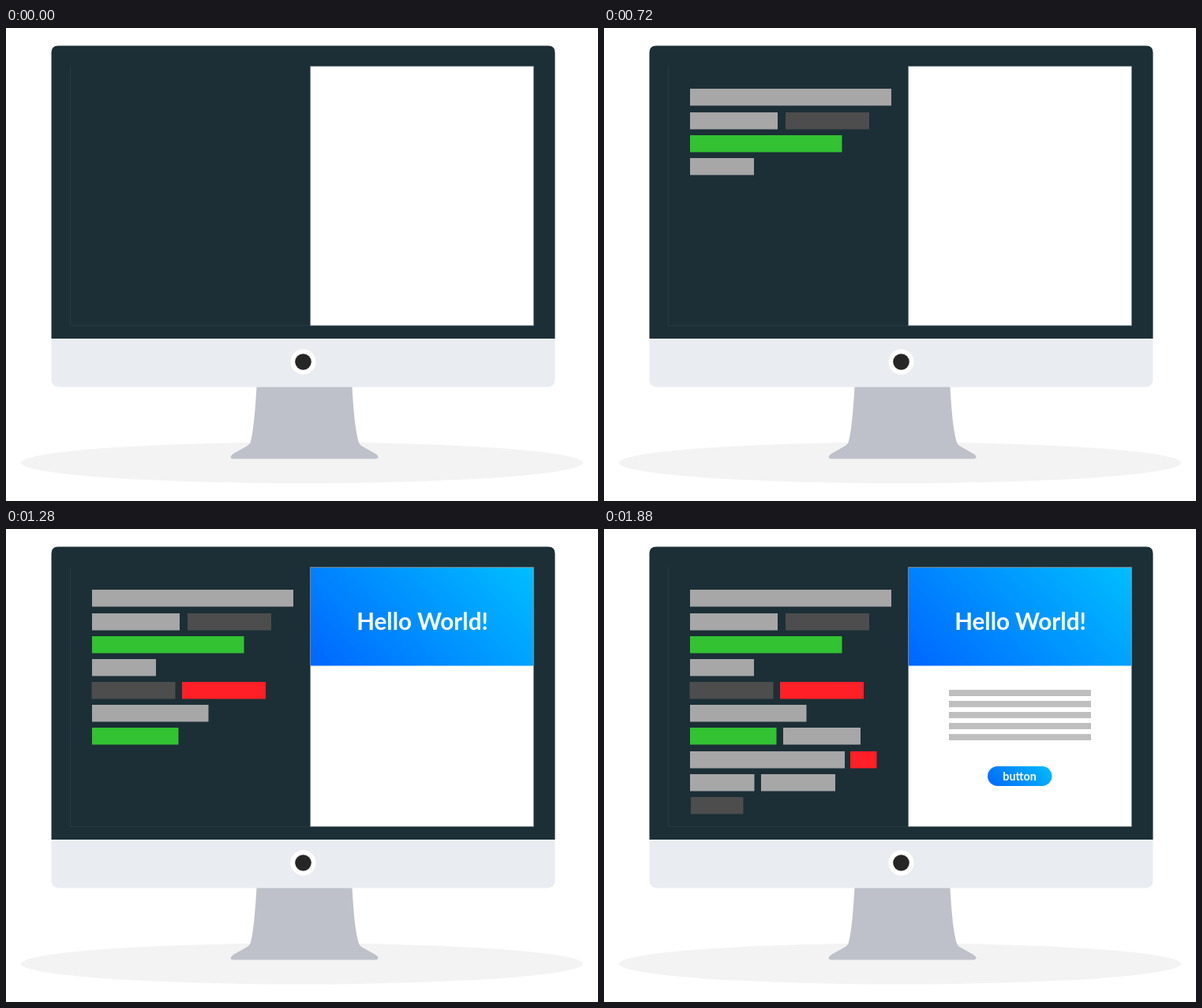
An HTML page that plays this animation: 750x600 px, repeating every 3040 ms.

```html
<!DOCTYPE html>
<html lang="en">
<head>
<meta charset="utf-8">
<title>Hello World</title>
<style>
  html, body { margin: 0; width: 100%; height: 100%; overflow: hidden; background: #fff; }
  svg { display: block; width: 750px; height: 600px; }
  text { font-family: Lato, sans-serif; font-weight: 700; fill: #fff; text-anchor: middle; }
</style>
</head>
<body>
<svg viewBox="0 0 750 600">
  <defs>
    <linearGradient id="sky" gradientUnits="userSpaceOnUse" x1="386" y1="173" x2="589.5" y2="-30.5">
      <stop stop-color="#0066ff"/><stop offset="1" stop-color="#00bfff"/>
    </linearGradient>
    <linearGradient id="pill" gradientUnits="userSpaceOnUse" x1="486" y1="326" x2="539.5" y2="272.5">
      <stop stop-color="#0066ff"/><stop offset="1" stop-color="#00bfff"/>
    </linearGradient>
  </defs>

  <ellipse cx="375" cy="551.5" rx="356" ry="26" fill="#f3f3f3"/>
  <path d="M317.5 455H438.500C440 480 442 510 447 526Q448 529 452 531L468 540Q472 542.500 471.500 544.500Q471 546.500 468 546.500H288Q285 546.500 284.500 544.500Q285 542 288 540L304 531Q308 529 309.500 526C314 510 316 480 317.500 455Z" fill="#bec1c9"/>
  <path d="M57.500 394V31Q57.500 22.500 66 22.500H687Q695.500 22.500 695.500 31V394Z" fill="#1c2f36"/>
  <path d="M57.500 394H695.500V445Q695.500 455.500 685 455.500H68Q57.500 455.500 57.500 445Z" fill="#e9edf2"/>
  <circle cx="376.5" cy="423.5" r="16" fill="#fff"/>
  <circle cx="376.5" cy="423.5" r="10.300" fill="#262626"/>

  <path d="M81.500 48.500V377.500H668.500V48.500" fill="none" stroke="#283b41"/>
  <rect x="385.500" y="48.500" width="283" height="329" fill="#fff" stroke="#64757a" stroke-width=".6"/>

  <g id="code"></g>
  <g id="header">
    <rect x="386" y="49" width="282" height="124.500" fill="url(#sky)"/>
    <text x="527.5" y="128" font-size="29.600">Hello World!</text>
  </g>
  <path id="lines" d="M437 208H617M437 222H617M437 236H617M437 250H617M437 264H617" stroke="#bfbfbf" stroke-width="8"/>
  <g id="button">
    <rect x="486" y="301" width="81.500" height="25" rx="12.500" fill="url(#pill)"/>
    <text x="526.5" y="319" font-size="14.300">button</text>
  </g>
</svg>
<script>
const LOOP = 3040, STEP = 40;
const GREY = '#a7a7a7', DARK = '#4d4d4d', GREEN = '#32c232', RED = '#ff1f26';

// row, x, width, colour, start and end of typing in ms
const bars = [
  [0, 109, 255, GREY, 170, 260],
  [1, 109, 111, GREY, 270, 360],
  [1, 230, 106, DARK, 390, 480],
  [2, 109, 192.5, GREEN, 510, 600],
  [3, 109, 81, GREY, 630, 720],
  [4, 108.5, 106, DARK, 830, 920],
  [4, 223, 106, RED, 950, 1040],
  [5, 109, 147.5, GREY, 1070, 1160],
  [6, 109, 109.5, GREEN, 1190, 1280],
  [6, 227, 98, GREY, 1285, 1360],
  [7, 109, 196, GREY, 1370, 1470],
  [7, 312, 33.5, RED, 1490, 1560],
  [8, 109, 81.5, GREY, 1600, 1680],
  [8, 199, 94, GREY, 1700, 1780],
  [9, 110, 66.5, DARK, 1790, 1860]
];
const popTimes = { header: 840, lines: 1400, button: 1880 };

const code = document.getElementById('code');
const rects = bars.map(([row, x, , fill]) => {
  const rect = document.createElementNS(code.namespaceURI, 'rect');
  const attrs = { x, y: Math.round(77.4 + 29.17 * row), height: 21.5, fill };
  for (const name in attrs) rect.setAttribute(name, attrs[name]);
  return code.appendChild(rect);
});

function draw(now) {
  const t = Math.floor(now % LOOP / STEP) * STEP;
  bars.forEach(([, , width, , start, end], i) => {
    const p = Math.min(1, Math.max(0, (t - start) / (end - start)));
    rects[i].setAttribute('width', width * p);
  });
  for (const id in popTimes) {
    document.getElementById(id).style.display = t >= popTimes[id] ? '' : 'none';
  }
}

const begin = performance.now();
function tick() {
  draw(performance.now() - begin);
  requestAnimationFrame(tick);
}
tick();
</script>
</body>
</html>
```
